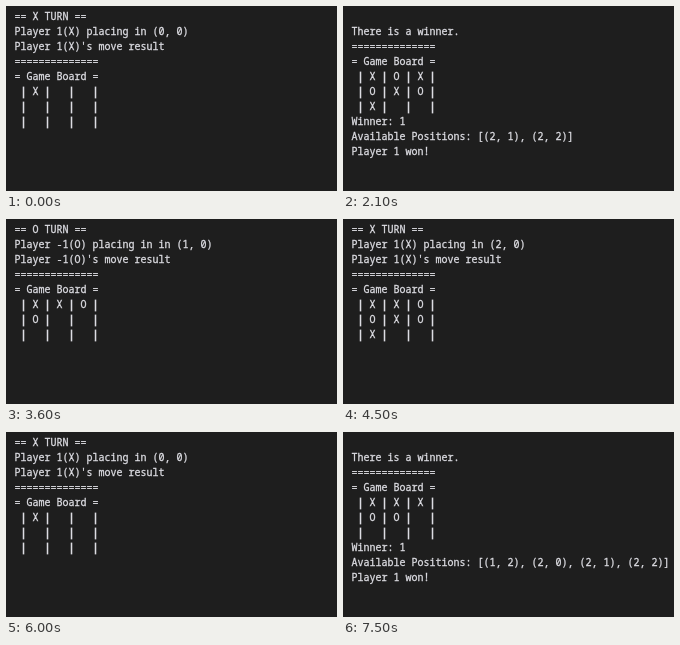
Write an HTML page that moves like this. It is 331 px wide and 185 px high and loops after 8 s.

```html
<!DOCTYPE html>
<html lang="en">
<head>
<meta charset="utf-8">
<title>Game Board</title>
<style>
  html, body { margin: 0; width: 100%; height: 100%; overflow: hidden; background: #1e1e1e; }
  svg { display: block; width: 331px; height: 185px; }
  text {
    font: 10px "Noto Sans Mono", "DejaVu Sans Mono", monospace;
    font-variant-ligatures: none;
    white-space: pre;
    fill: #dcdce2;
    stroke: #dcdce2;
    stroke-width: .3px;
  }
  .bar { stroke-width: .8px; }
</style>
</head>
<body>
<svg id="screen" viewBox="0 0 331 185"></svg>
<script>
const LOOP = 8000, STEP = 300, LINES = 10;

// Cells are numbered 0-8 in row order; X always opens.
// "order" lists which move is shown at each step.
const games = [
  { moves: [0, 1, 2, 3, 4, 5, 6], order: [1, 2, 3, 4, 5, 7, 6], hold: 600 },
  { moves: [0, 2, 1, 3, 4, 5, 6, 7, 8], hold: 600 },
  { moves: [0, 3, 1, 4, 2], hold: 500 }
];

const mark = i => i % 2 ? 'O' : 'X';
const pos = cell => `(${Math.floor(cell / 3)}, ${cell % 3})`;

function board(moves) {
  const cells = Array(9).fill(' ');
  moves.forEach((cell, i) => cells[cell] = mark(i));
  const rows = [0, 3, 6].map(r => ` | ${cells.slice(r, r + 3).join(' | ')} |`);
  return ['='.repeat(14), '= Game Board =', ...rows];
}

function turn(moves) {
  const i = moves.length - 1, m = mark(i);
  const player = m === 'X' ? 'Player 1(X)' : 'Player -1(O)';
  const verb = m === 'X' ? 'placing in' : 'placing in in';
  return [
    `== ${m} TURN ==`,
    `${player} ${verb} ${pos(moves[i])}`,
    `${player}'s move result`,
    ...board(moves)
  ];
}

function result(moves) {
  const free = [...Array(9).keys()].filter(c => !moves.includes(c));
  return [
    '',
    'There is a winner.',
    ...board(moves),
    'Winner: 1',
    `Available Positions: [${free.map(pos).join(', ')}]`,
    'Player 1 won!'
  ];
}

const scenes = [];
let clock = 0;
function add(lines, duration) {
  scenes.push({ start: clock, lines });
  clock += duration;
}
for (const { moves, order, hold } of games) {
  const shown = order || moves.map((_, i) => i + 1);
  shown.forEach(n => add(turn(moves.slice(0, n)), STEP));
  add(result(moves), hold);
}

const screen = document.getElementById('screen');
const rows = Array.from({ length: LINES }, (_, i) => {
  const row = document.createElementNS('http://www.w3.org/2000/svg', 'text');
  row.setAttribute('x', 8.4);
  row.setAttribute('y', 14 + 15 * i);
  return screen.appendChild(row);
});

const markup = line => line.replaceAll('|', '<tspan class="bar">|</tspan>');

let current;
function draw(time) {
  const t = time % LOOP;
  const scene = scenes.findLast(s => s.start <= t);
  if (scene !== current) {
    current = scene;
    rows.forEach((row, i) => row.innerHTML = markup(scene.lines[i] || ''));
  }
}

const began = performance.now();
function tick() {
  draw(performance.now() - began);
  requestAnimationFrame(tick);
}
tick();
</script>
</body>
</html>
```
